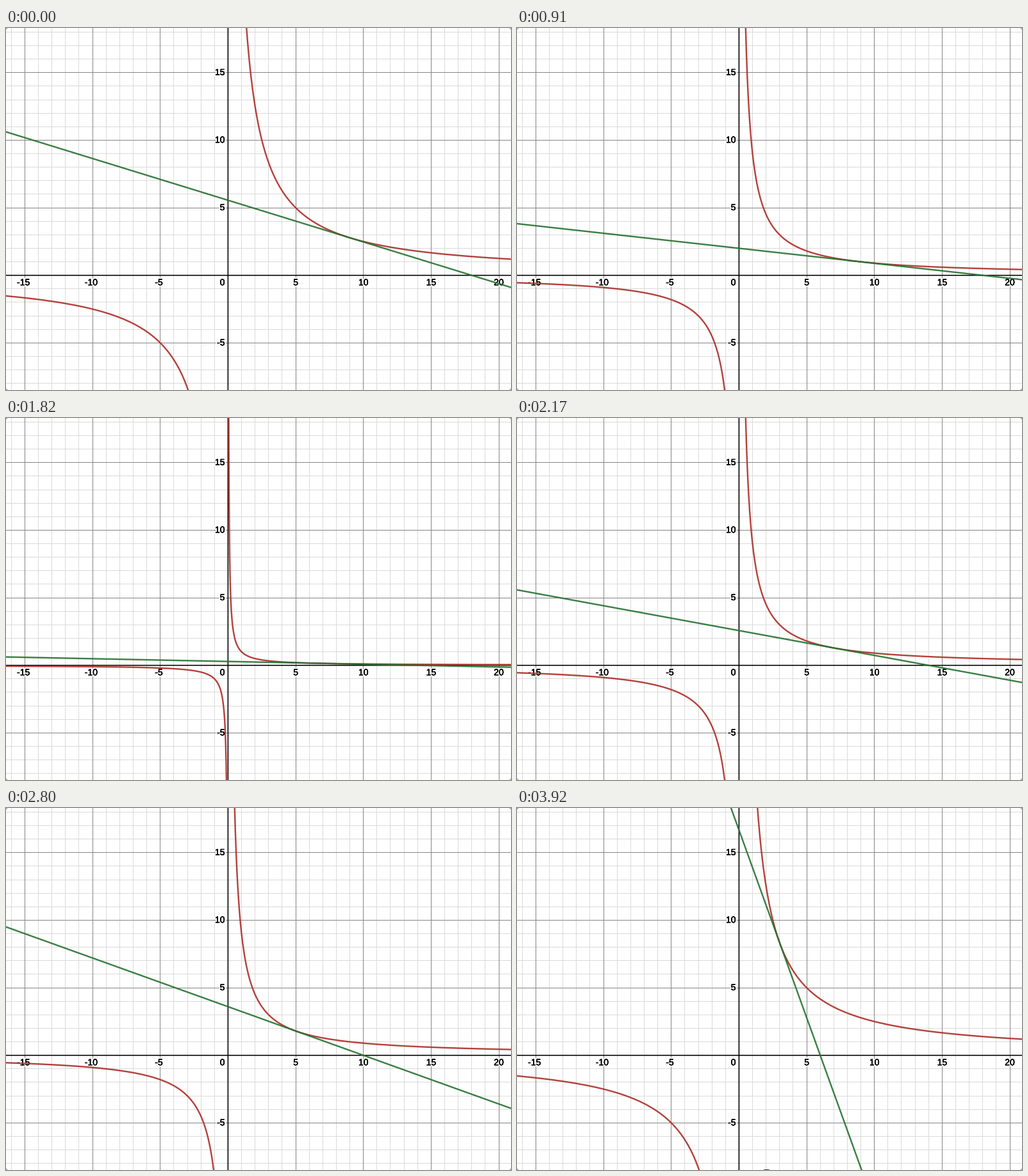
These frames come from a looping animation (788 px wide and 566 px high, 3990 ms). A matplotlib script:

```python
import math

import matplotlib.pyplot as plt
import numpy as np
from matplotlib.animation import FuncAnimation
from matplotlib.patches import Ellipse, Polygon
from matplotlib.patheffects import withStroke

W, H, DPI = 788, 566, 100
STEP, FRAMES = 70, 57
X0, Y0, UNIT = 346.4, 386.7, 21.13
RED, GREEN = "#ac2d27", "#247130"

# start time in ms, k of y = k / x, x of the point of tangency
STATES = [
    (0, 25, 9), (280, 9, 9), (420, 9, 10), (910, 9, 9),
    (1260, 1, 9), (1400, 1, 8), (1820, 1, 7),
    (2170, 9, 7), (2310, 9, 6), (2800, 9, 5),
    (3080, 25, 5), (3220, 25, 4), (3710, 25, 3),
]
SPECK_START = 3920


def pt(px):
    return px * 72 / DPI


def sx(x):
    return X0 + UNIT * x


def sy(y):
    return Y0 - UNIT * y


fig = plt.figure(figsize=(W / DPI, H / DPI), dpi=DPI, facecolor="white")
ax = fig.add_axes([0, 0, 1, 1])
ax.set_xlim(0, W)
ax.set_ylim(H, 0)
ax.axis("off")


def grid_line(value, vertical):
    if value == 0:
        color, width, z = "black", 1.6, 3
    elif value % 5 == 0:
        color, width, z = "#858585", 1, 2
    else:
        color, width, z = "#dadada", 1, 1
    pos = sx(value) if vertical else sy(value)
    if value:
        pos = math.floor(pos) + 0.5  # keep thin lines on whole pixels
    style = dict(color=color, lw=pt(width), zorder=z, snap=False)
    if vertical:
        ax.plot([pos, pos], [0, H], **style)
    else:
        ax.plot([0, W], [pos, pos], **style)


def label(x, baseline, value, align):
    ax.text(x, baseline, str(value), ha=align, va="baseline", zorder=4,
            family="Liberation Sans", size=pt(14), color="black",
            path_effects=[withStroke(linewidth=pt(4), foreground="white"),
                          withStroke(linewidth=pt(0.35), foreground="black")])


for v in range(-16, 21):
    grid_line(v, True)
for v in range(-8, 19):
    grid_line(v, False)

for v in (-15, -10, -5, 5, 10, 15, 20):
    label(sx(v) - (2.3 if v < 0 else 0), 402.2, v, "center")
for v in (-5, 5, 10, 15):
    label(341.5, sy(v) + 3.9, v, "right")
label(341.5, 402.2, 0, "right")

# rounded window corners
for cx, dx in ((0, 3), (W, -3)):
    for cy, dy in ((0, 3), (H, -3)):
        ax.add_patch(Polygon([(cx, cy), (cx + dx, cy), (cx, cy + dy)],
                             fc="#b0b0b0", ec="none", zorder=8))

stroke = dict(lw=pt(2.4), alpha=0.9, solid_joinstyle="round")
right, = ax.plot([], [], color=RED, zorder=5, **stroke)
left, = ax.plot([], [], color=RED, zorder=5, **stroke)
tangent, = ax.plot([], [], color=GREEN, zorder=6, **stroke)
speck = ax.add_patch(Ellipse((389.5, 567.4), 13, 5, fc="#303030", ec="none",
                             zorder=7, visible=False))


def draw(i):
    t = i * STEP
    _, k, a = [s for s in STATES if s[0] <= t][-1]
    x = np.geomspace(k / 25, 22, 400)
    right.set_data(sx(x), sy(k / x))
    left.set_data(sx(-x), sy(-k / x))
    ends = np.array([-17, 22])
    tangent.set_data(sx(ends), sy(2 * k / a - k / a**2 * ends))
    speck.set_visible(t >= SPECK_START)
    return right, left, tangent, speck


anim = FuncAnimation(fig, draw, frames=FRAMES, interval=STEP,
                     init_func=lambda: draw(0), repeat=True, repeat_delay=0)
plt.show()
```
